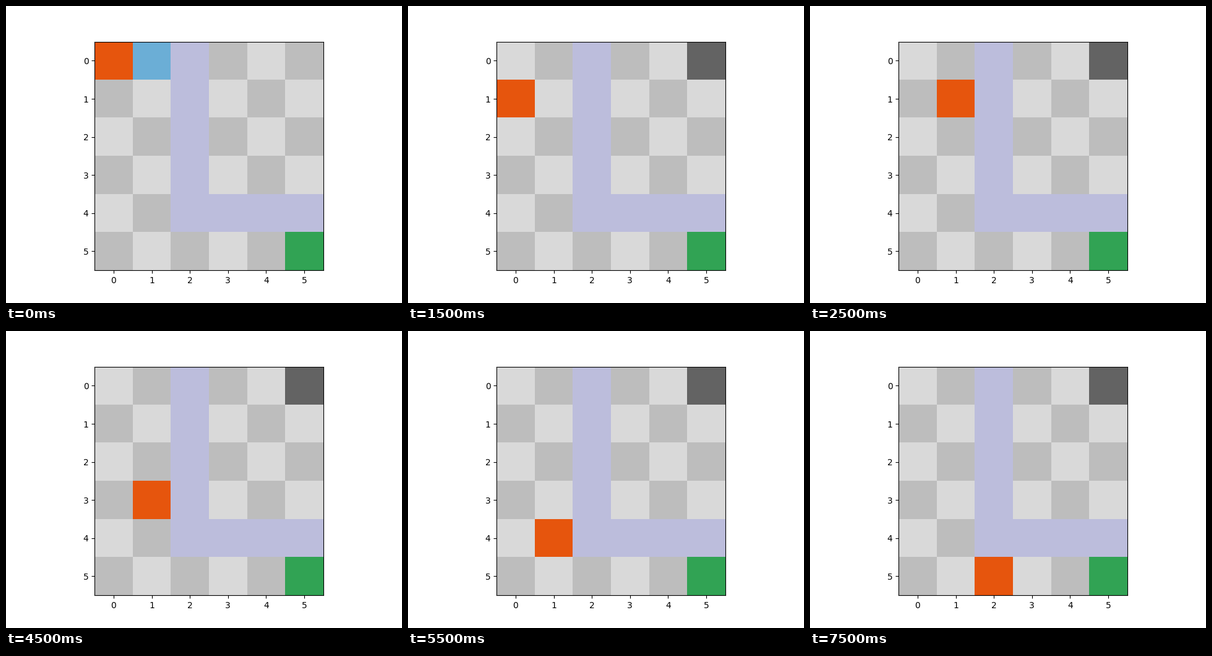
Recreate the animation shown at these times as a matplotlib script. Size 640 by 480 pixels, loop 8 s.

```python
import numpy as np
import matplotlib.pyplot as plt
from matplotlib.animation import FuncAnimation
from matplotlib.colors import to_rgb

SIZE = 6
STEP_MS = 500
LIGHT, DARK = "#d9d9d9", "#bdbdbd"
WATER, GOAL, AGENT = "#bcbddc", "#31a354", "#e6550d"
KEY, BLOCK = "#6baed6", "#636363"

# (row, column) of the agent, one entry per second after the first half second
PATH = [(0, 0), (0, 0), (1, 0), (1, 1), (2, 1), (3, 1), (4, 1), (5, 1), (5, 2)]


def base_grid():
    grid = np.empty((SIZE, SIZE, 3))
    for row in range(SIZE):
        for col in range(SIZE):
            grid[row, col] = to_rgb(DARK if (row + col) % 2 else LIGHT)
    grid[:5, 2] = to_rgb(WATER)
    grid[4, 2:] = to_rgb(WATER)
    grid[5, 5] = to_rgb(GOAL)
    return grid


BASE = base_grid()


def world(frame):
    step = (frame + 1) // 2
    grid = BASE.copy()
    if step == 0:
        grid[0, 1] = to_rgb(KEY)
    else:
        grid[0, 5] = to_rgb(BLOCK)
    grid[PATH[step]] = to_rgb(AGENT)
    return grid


fig, ax = plt.subplots(figsize=(6.4, 4.8), dpi=100)
image = ax.imshow(world(0))
ax.set_xticks(range(SIZE))
ax.set_yticks(range(SIZE))


def update(frame):
    image.set_data(world(frame))
    return [image]


anim = FuncAnimation(fig, update, frames=16, interval=STEP_MS,
                     repeat=True, repeat_delay=0)
plt.show()
```
